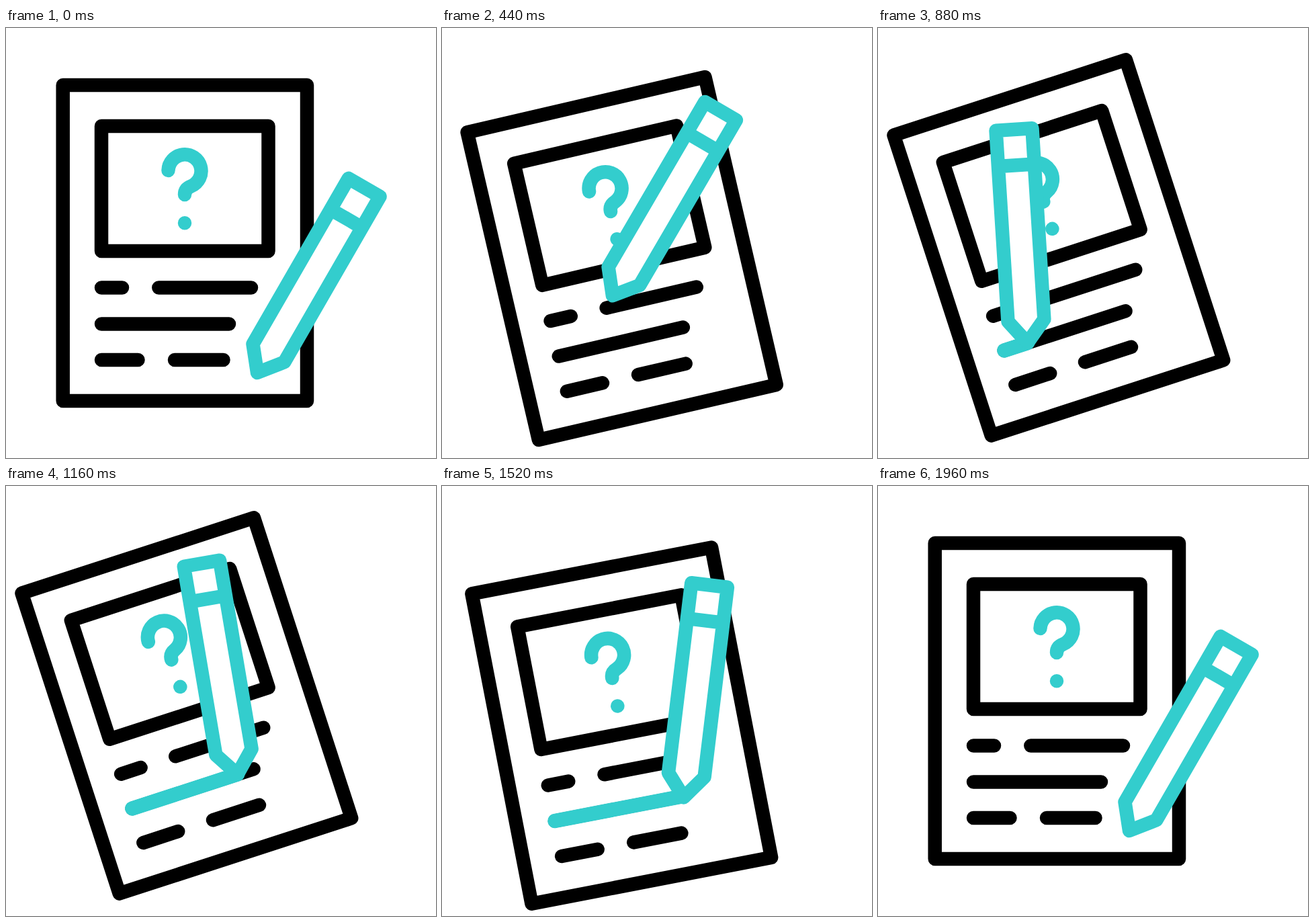
An HTML page for the animation above (2000 ms loop, 640 by 640 pixels).

```html
<!DOCTYPE html>
<html>
<head>
<meta charset="utf-8">
<style>
html, body { margin: 0; height: 100%; overflow: hidden; background: #fff; }
svg { display: block; width: 100vw; height: 100vh; }
g, path { fill: none; stroke-width: 20.5; stroke-linecap: round; stroke-linejoin: round; }
.ink { stroke: #000; }
.teal { stroke: #33cdcd; }
</style>
</head>
<body>
<svg viewBox="0 0 640 640">
  <g id="paper">
    <path class="ink" d="M84.7 85H448V555H84.7ZM142 146H390.5V332H142Z
      M142 386.5H173M227.3 386.5H365M142 440.5H332M142 494H196.5M251 494H323.5"/>
    <path class="teal" d="M241.5 212A24.5 24.5 0 1 1 275.7 235.3Q266 239 266 248M266 290.3h.01"/>
    <path class="teal" id="stroke" style="stroke-width:21.5"/>
  </g>
  <g id="pencil" class="teal">
    <path style="fill:#fff" d="M0 0L-27 -33.7V-318.3H27V-33.7ZM-27 -265H27"/>
  </g>
</svg>
<script>
const LOOP = 2000, STEP = 40, CX = 266.25, CY = 320;
const LINE = { x: 142, y: 440.5, length: 190 };
const [paper, pencil, stroke] = ['paper', 'pencil', 'stroke'].map(id => document.getElementById(id));

const clamp = v => Math.min(1, Math.max(0, v));
const ramp = (t, from, to) => clamp((t - from) / (to - from));
const ease = (t, from, to) => { const u = ramp(t, from, to); return u * u * (3 - 2 * u); };

// Bezier curve of any degree
function bezier(u, ...p) {
  while (p.length > 1) p = p.slice(1).map((v, i) => p[i] + (v - p[i]) * u);
  return p[0];
}

function paperPose(t) {
  const back = ease(t, 1240, 1894);
  const out = ease(t, 120, 608);
  const tilt = out - back;
  return {
    angle: -18 * tilt,
    dx: 2.5 * tilt * tilt,
    dy: t < 1240 ? bezier(out, 0, 66.5, 22, 7) : bezier(back, 7, 66.5, 22, 0)
  };
}

// Stage position of a point on the writing line
function linePoint(pose, along) {
  const a = pose.angle * Math.PI / 180;
  const x = LINE.x + along - CX, y = LINE.y - CY;
  return [
    CX + pose.dx + x * Math.cos(a) - y * Math.sin(a),
    CY + pose.dy + x * Math.sin(a) + y * Math.cos(a)
  ];
}

function pencilPose(t, pose, written) {
  if (t < 720) {
    const u = ease(t, 120, 720);
    return [bezier(u, 374, 226, 276.7, 188), bezier(u, 513, 157, 536.7, 480.5), bezier(u, 30, 87.4, -3.2, -1.9)];
  }
  if (t < 1290) return [...linePoint(pose, LINE.length * written), -1.9 - 8.9 * written];
  const u = ease(t, 1290, 1900);
  return [bezier(u, 368.5, 347, 374), bezier(u, 424.5, 493.4, 513), bezier(u, -10.8, 20.4, 30)];
}

function draw(now) {
  const t = Math.floor(now % LOOP / STEP) * STEP;
  const pose = paperPose(t);
  const written = ease(t, 720, 1290);
  const [x, y, angle] = pencilPose(t, pose, written);
  paper.setAttribute('transform', `translate(${pose.dx} ${pose.dy}) rotate(${pose.angle} ${CX} ${CY})`);
  pencil.setAttribute('transform', `translate(${x} ${y}) rotate(${angle})`);
  stroke.setAttribute('d', `M${LINE.x} ${LINE.y}h${LINE.length * written + 0.01}`);
  stroke.style.opacity = t < 720 ? 0 : 1 - ramp(t, 1560, 1880);
}

let start;
function frame(now) {
  start ??= now;
  draw(now - start);
  requestAnimationFrame(frame);
}
draw(0);
requestAnimationFrame(frame);
</script>
</body>
</html>
```
